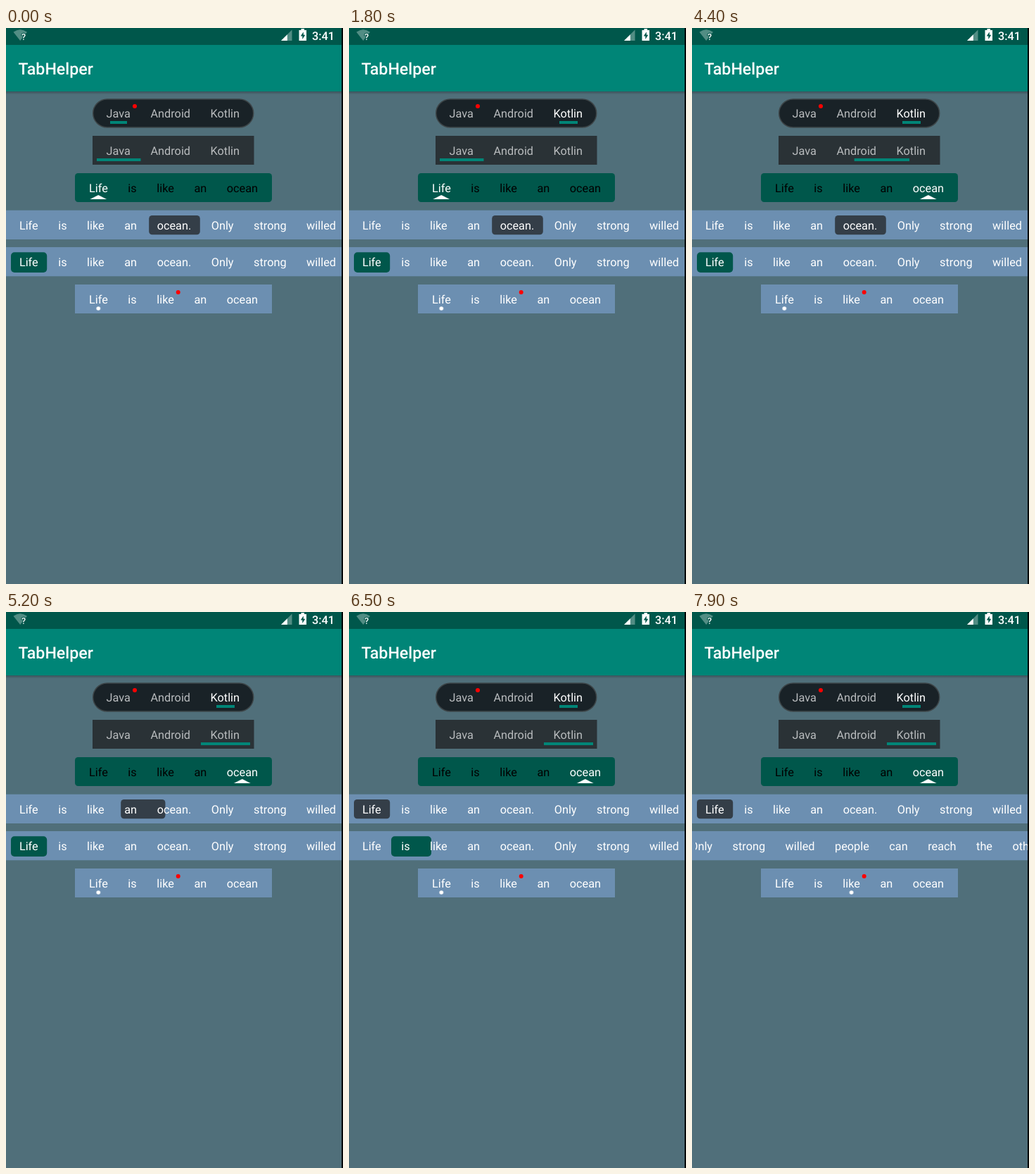
Recreate the animation shown at these times as an HTML page. Size 479x789 px, loop 8000 ms.

```html
<!DOCTYPE html>
<html lang="en">
<head>
<meta charset="utf-8">
<title>TabHelper</title>
<style>
  html, body { margin: 0; width: 100%; height: 100%; overflow: hidden; background: #000; }
  svg { display: block; width: 479px; height: 789px; }
  text { font-family: Roboto, sans-serif; font-size: 16.3px; fill: #fff; text-rendering: geometricPrecision; white-space: pre; }
  .muted text { fill: #b9bcbe; }
  .dark text { fill: #000; }
  .medium { font-weight: 500; }
</style>
</head>
<body>
<svg viewBox="0 0 479 789">
  <defs>
    <linearGradient id="shade" x2="0" y2="1">
      <stop offset="0" stop-opacity=".28"/>
      <stop offset="1" stop-opacity="0"/>
    </linearGradient>
    <clipPath id="viewport"><rect x="4.6" y="311" width="472.4" height="42"/></clipPath>
  </defs>

  <rect width="477" height="789" fill="#506f7a"/>
  <rect y="89.5" width="477" height="5" fill="url(#shade)"/>
  <rect y="24" width="477" height="66" fill="#008577"/>
  <rect width="477" height="24" fill="#00574b"/>
  <text class="medium" x="17.6" y="66" style="font-size:23.2px">TabHelper</text>

  <!-- status icons -->
  <path d="M10.5 5.8Q20-1.5 30 5.8L20.2 18Z" fill="#fff" fill-opacity=".32"/>
  <text class="medium" x="22" y="17" style="font-size:12.5px;stroke:#00574b;stroke-width:2px;paint-order:stroke">?</text>
  <path d="M406.5 2.5V18H391Z" fill="#fff" fill-opacity=".32"/>
  <path d="M399.8 9.2V18H391Z" fill="#fff"/>
  <path d="M419.5 1h4.500v2h3v15h-10.500v-15h3Z" fill="#fff"/>
  <path d="M422.800 5.500L418.700 11.500H421.300V16L425.300 9.800H422.800Z" fill="#00574b"/>
  <text class="medium" x="435" y="16.500">3:41</text>

  <g class="muted" id="rounded">
    <rect x="123.700" y="101" width="228" height="40" rx="20" fill="#192227" stroke="#3d4548" stroke-width="1.500"/>
    <rect id="shortBar" y="132" height="4" fill="#008577"/>
    <circle cx="183" cy="111" r="3" fill="#f00"/>
  </g>

  <g class="muted" id="square">
    <rect x="123" y="153" width="229.500" height="41" fill="#2a3236"/>
    <rect id="longBar" y="185" height="4" fill="#008577"/>
  </g>

  <g class="dark" id="green">
    <rect x="98" y="206" width="280" height="41" rx="4.500" fill="#00574b"/>
    <path id="arrow" d="M-11.800 243L0 237L11.800 243Z" fill="#fff"/>
  </g>

  <g id="wide">
    <rect y="258.700" width="477" height="41.300" fill="#6c8fb1"/>
    <rect id="darkPill" y="266" height="27.200" rx="4.500" fill="#343e48"/>
  </g>

  <rect y="311" width="477" height="41.300" fill="#6c8fb1"/>
  <g clip-path="url(#viewport)">
    <g id="scroller">
      <rect id="greenPill" y="318.200" height="28.800" rx="5" fill="#00574b"/>
    </g>
  </g>

  <g id="dotted">
    <rect x="98" y="364" width="280" height="41" fill="#6c8fb1"/>
    <circle id="dot" cy="398" r="2.800" fill="#fff"/>
    <circle cx="244.700" cy="375" r="3" fill="#f00"/>
  </g>
</svg>

<script>
const LOOP = 8000, TICK = 100, MOVE = 300, GAP = 28.5;
const $ = id => document.getElementById(id);

// Lays out a row of tab labels and returns them by word.
function labels(id, x, y, line) {
  const out = {};
  for (const word of line.split(' ')) {
    const el = document.createElementNS('http://www.w3.org/2000/svg', 'text');
    el.textContent = word;
    el.setAttribute('x', x);
    el.setAttribute('y', y);
    $(id).append(el);
    x += el.getComputedTextLength() + GAP;
    out[word] = el;
  }
  return out;
}

// Accelerate-decelerate progress sampled once per tick, from phase to the end.
function glide(phase) {
  const steps = [];
  for (let p = phase; ; p += TICK / MOVE) {
    steps.push(p < 1 ? (1 - Math.cos(Math.PI * p)) / 2 : 1);
    if (p >= 1) return steps;
  }
}

const run = (el, frames) => el.animate(
  frames.map(f => ({ ...f, easing: 'step-end' })),
  { duration: LOOP, iterations: Infinity });

// moves: [time, target values, progress steps]
function move(el, style, start, moves) {
  const frames = [{ offset: 0, ...style(...start) }];
  let from = start;
  for (const [at, to, steps] of moves) {
    steps.forEach((p, i) => frames.push({
      offset: (at + i * TICK) / LOOP,
      ...style(...from.map((v, k) => v + (to[k] - v) * p))
    }));
    from = to;
  }
  run(el, [...frames, { offset: 1, ...style(...from) }]);
}

// changes: [time, colour]; the first one is at 0
function recolor(el, changes) {
  const frames = changes.map(([at, fill]) => ({ offset: at / LOOP, fill }));
  run(el, [...frames, { offset: 1, fill: frames.at(-1).fill }]);
}

const span = (left, right) => ({ x: left + 'px', width: right - left + 'px' });
const shift = x => ({ transform: `translateX(${x}px)` });

const LANGS = 'Java Android Kotlin';
const SHORT = 'Life is like an ocean';
const LONG = 'Life is like an ocean. Only strong willed people can reach the other shore';
const SLOW = glide(.14), FAST = glide(.348), MUTED = '#b9bcbe', WHITE = '#fff', BLACK = '#000';

const langs = labels('rounded', 142.6, 127.4, LANGS);
labels('square', 142.6, 180, LANGS);
const life = labels('green', 118, 232.8, SHORT);
labels('wide', 18.9, 285.5, LONG.split(' ').slice(0, 8).join(' '));
labels('scroller', 18.9, 338.2, LONG);
labels('dotted', 118, 390.8, SHORT);

move($('shortBar'), span, [148, 172], [
  [800, [218.300, 250.300], SLOW], [1500, [299, 325], SLOW]]);
recolor(langs.Android, [[0, MUTED], [800, WHITE], [1500, MUTED]]);
recolor(langs.Kotlin, [[0, MUTED], [1500, WHITE]]);

move($('arrow'), shift, [131.2], [
  [2400, [226.8], SLOW], [3000, [335.7], SLOW]]);
recolor(life.Life, [[0, WHITE], [2400, BLACK]]);
recolor(life.like, [[0, BLACK], [2400, WHITE], [3000, BLACK]]);
recolor(life.ocean, [[0, BLACK], [3000, WHITE]]);

move($('longBar'), span, [129, 191.5], [
  [3600, [191.5, 277], SLOW], [4300, [277, 347], SLOW]]);

move($('darkPill'), span, [203.2, 275.800], [
  [5100, [103.4, 152.600], glide(.103)], [5800, [7, 58.200], FAST]]);

move($('greenPill'), span, [7, 58.200], [[6500, [203.2, 275.800], FAST]]);
move($('scroller'), shift, [0], [[7600, [-294.5], [.08, .4, .75, 1]]]);

move($('dot'), shift, [131.3], [[7000, [226.6], SLOW]]);
</script>
</body>
</html>
```
